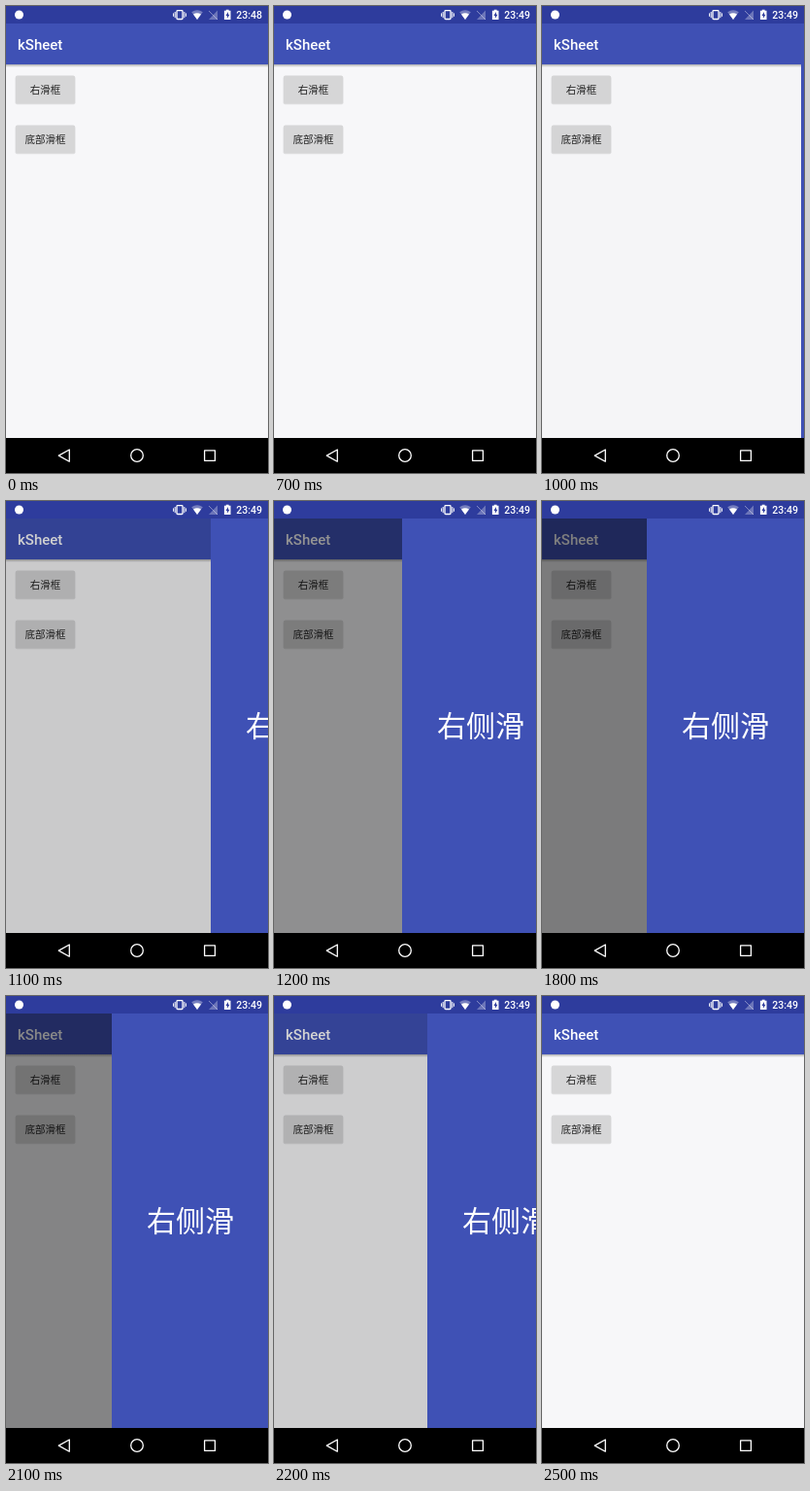
Recreate the animation shown at these times as an HTML page. Size 270 px wide and 480 px high, loop 2.6 s.

```html
<!DOCTYPE html>
<html lang="zh-CN">
<head>
<meta charset="utf-8">
<style>
  html, body { margin: 0; width: 100%; height: 100%; overflow: hidden; background: #000; }
  svg { display: block; width: 270px; height: 480px; }
  text { font-family: Roboto, "Noto Sans CJK SC", "Noto Sans CJK", sans-serif; }
  .label { font-size: 10.5px; font-weight: 500; fill: #202020; text-anchor: middle; }
</style>
</head>
<body>
<svg viewBox="0 0 270 480">
  <defs>
    <linearGradient id="shade" x2="0" y2="1">
      <stop stop-color="#000" stop-opacity=".3"/>
      <stop offset="1" stop-color="#000" stop-opacity="0"/>
    </linearGradient>
    <clipPath id="screen"><rect y="18" width="270" height="426"/></clipPath>
  </defs>

  <rect width="270" height="444" fill="#f7f7f9"/>
  <rect y="18" width="270" height="42" fill="#3f51b5"/>
  <rect y="60" width="270" height="3" fill="url(#shade)"/>
  <text x="12" y="45" font-size="15" font-weight="500" fill="#fff">kSheet</text>
  <g id="buttons"></g>

  <g clip-path="url(#screen)">
    <rect id="dim" y="18" width="270" height="426"/>
    <g id="panel">
      <rect y="18" width="162" height="426" fill="#3f51b5"/>
      <text x="81" y="242.3" font-size="30" fill="#fff" text-anchor="middle">右侧滑</text>
    </g>
  </g>

  <rect width="270" height="18" fill="#2e3c9d"/>
  <g fill="#fff">
    <circle cx="13.5" cy="9" r="4.5"/>
    <rect x="176" y="4.7" width="6" height="8.8" rx=".8" fill="none" stroke="#fff" stroke-width="1.3"/>
    <path d="M174.2 6v6.2M172.6 7.4v3.4M183.8 6v6.2M185.4 7.4v3.4" stroke="#fff" stroke-width="1"/>
    <path d="M191.2 6.3Q197 2.3 202.8 6.3L197 14z" opacity=".35"/>
    <path d="M193 8.6Q197 6 201 8.6L197 14z"/>
    <path d="M218 4.5V14h-9z" opacity=".3"/>
    <path d="M209 5l9 9" stroke="#fff" stroke-width="1" opacity=".4"/>
    <path d="M226.8 4.8V3.8h2.8v1h1.9V14h-6.6V4.8z"/>
    <path d="M229 6l-2.6 4h1.5v2.7l2.6-4H229z" fill="#2e3c9d"/>
    <text id="clock" x="264" y="13" font-size="10.5" font-weight="500" text-anchor="end"></text>
  </g>

  <rect y="444" width="270" height="36"/>
  <g fill="none" stroke="#fff" stroke-width="1.3" stroke-linejoin="round">
    <path d="M65.3 456v12.2l-11-6.1z"/>
    <circle cx="135" cy="462" r="6.3"/>
    <rect x="204.6" y="456.8" width="10.8" height="10.6"/>
  </g>
</svg>
<script>
  const LOOP = 2600, STEP = 100;
  const OPEN_AT = 976, CLOSE_AT = 2088, SLIDE = 300, FADE = 170;
  const OPEN_X = 108, CLOSED_X = 270;
  const byId = id => document.getElementById(id);
  const clamp = v => Math.min(1, Math.max(0, v));
  const ease = v => (1 - Math.cos(Math.PI * clamp(v))) / 2;

  const button = (y, label) => `
    <rect x="9.5" y="${y + .6}" width="62" height="29.2" rx="2" opacity=".1"/>
    <rect x="10" y="${y}" width="61" height="28.8" rx="1.5" fill="#d6d6d7"/>
    <text class="label" x="40.5" y="${y + 18.2}">${label}</text>`;
  byId("buttons").innerHTML = button(71.4, "右滑框") + button(122.5, "底部滑框");

  function render(t) {
    const opened = ease((t - OPEN_AT) / SLIDE);
    const closed = ease((t - CLOSE_AT) / SLIDE);
    const x = CLOSED_X + (OPEN_X - CLOSED_X) * (opened - closed);
    const dim = .5 * opened * (1 - clamp((t - CLOSE_AT) / FADE));
    byId("panel").setAttribute("transform", `translate(${Math.round(x)} 0)`);
    byId("dim").setAttribute("opacity", dim);
    byId("clock").textContent = t < 700 ? "23:48" : "23:49";
  }

  const start = performance.now();
  function tick() {
    const t = (performance.now() - start) % LOOP;
    render(Math.floor(t / STEP) * STEP);
    requestAnimationFrame(tick);
  }
  tick();
</script>
</body>
</html>
```
